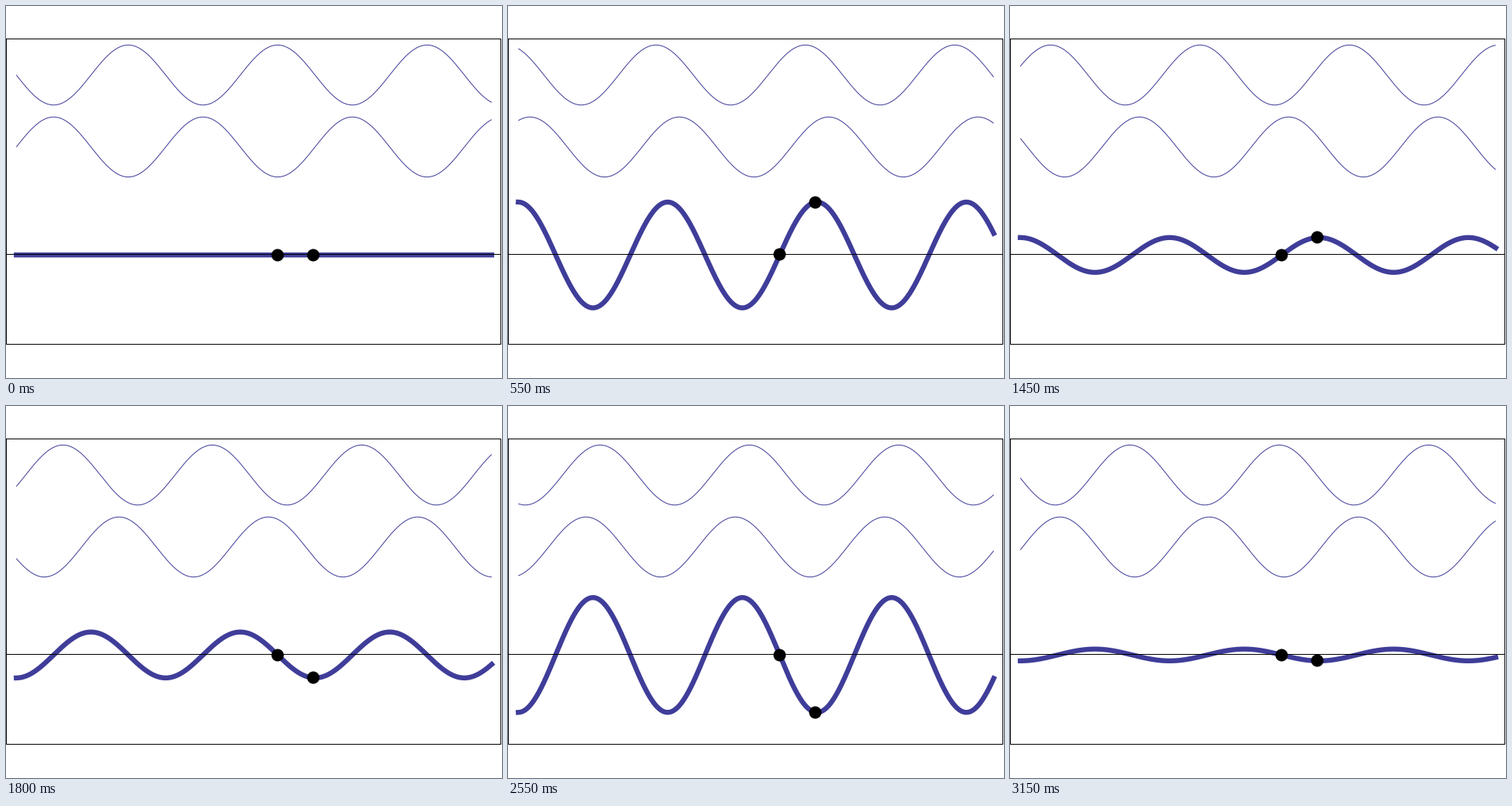
Animation, 640 px wide and 480 px high, one loop 3.2 s. Source, as a matplotlib script:

```python
import math

import numpy as np
import matplotlib.pyplot as plt
from matplotlib.animation import FuncAnimation
from matplotlib.patches import Circle

W, H, DPI = 640, 480, 100
FRAMES, INTERVAL = 64, 50
PT = 72 / DPI  # points per pixel
BLUE = (0.2472, 0.24, 0.6)

# Plot units to pixels
X0, XU = 13.27, 638 / 20.8
Y0, YU = 321.25, 38.7
NODE, ANTINODE = 11, 12.5
RIGHT_Y, LEFT_Y = 6, 3.6

x = np.linspace(0, 20, 601)


def px(u):
    return X0 + XU * u


def py(v):
    return Y0 - YU * v


def right_wave(u, t):
    return -np.sin(u - t)


def left_wave(u, t):
    return np.sin(u + t)


def standing(u, t):
    return 2 * np.cos(u) * np.sin(t)


def snap(v):
    return math.floor(v) + 0.5


fig = plt.figure(figsize=(W / DPI, H / DPI), dpi=DPI, facecolor="white")
ax = fig.add_axes([0, 0, 1, 1])
ax.set_xlim(0, W)
ax.set_ylim(H, 0)
ax.axis("off")


def curve(width, cap, z):
    line, = ax.plot([], [], color=BLUE, lw=width * PT, solid_capstyle=cap,
                    solid_joinstyle="round", snap=False, zorder=z)
    return line


def rule(xs, ys):
    ax.plot(xs, ys, color="black", lw=PT, solid_capstyle="projecting",
            solid_joinstyle="miter", snap=False, zorder=3)


top = curve(1, "butt", 1)
middle = curve(1, "butt", 1)
total = curve(6.4, "projecting", 2)

rule([0.5, 638.5, 638.5, 0.5, 0.5], [42.5, 42.5, 436.5, 436.5, 42.5])
rule([0.5, 638.5], [320.5, 320.5])

dots = [(u, ax.add_patch(Circle((0, 0), 8, fc="black", ec="none", zorder=4)))
        for u in (NODE, ANTINODE)]


def update(i):
    t = 2 * math.pi * i / FRAMES
    top.set_data(px(x), py(RIGHT_Y + right_wave(x, t)))
    middle.set_data(px(x), py(LEFT_Y + left_wave(x, t)))
    total.set_data(px(x), py(standing(x, t)))
    for u, dot in dots:
        dot.center = snap(px(u)), snap(py(standing(u, t)))
    return [top, middle, total] + [dot for _, dot in dots]


anim = FuncAnimation(fig, update, frames=FRAMES, interval=INTERVAL,
                     repeat=True, repeat_delay=0, blit=False)
plt.show()
```
